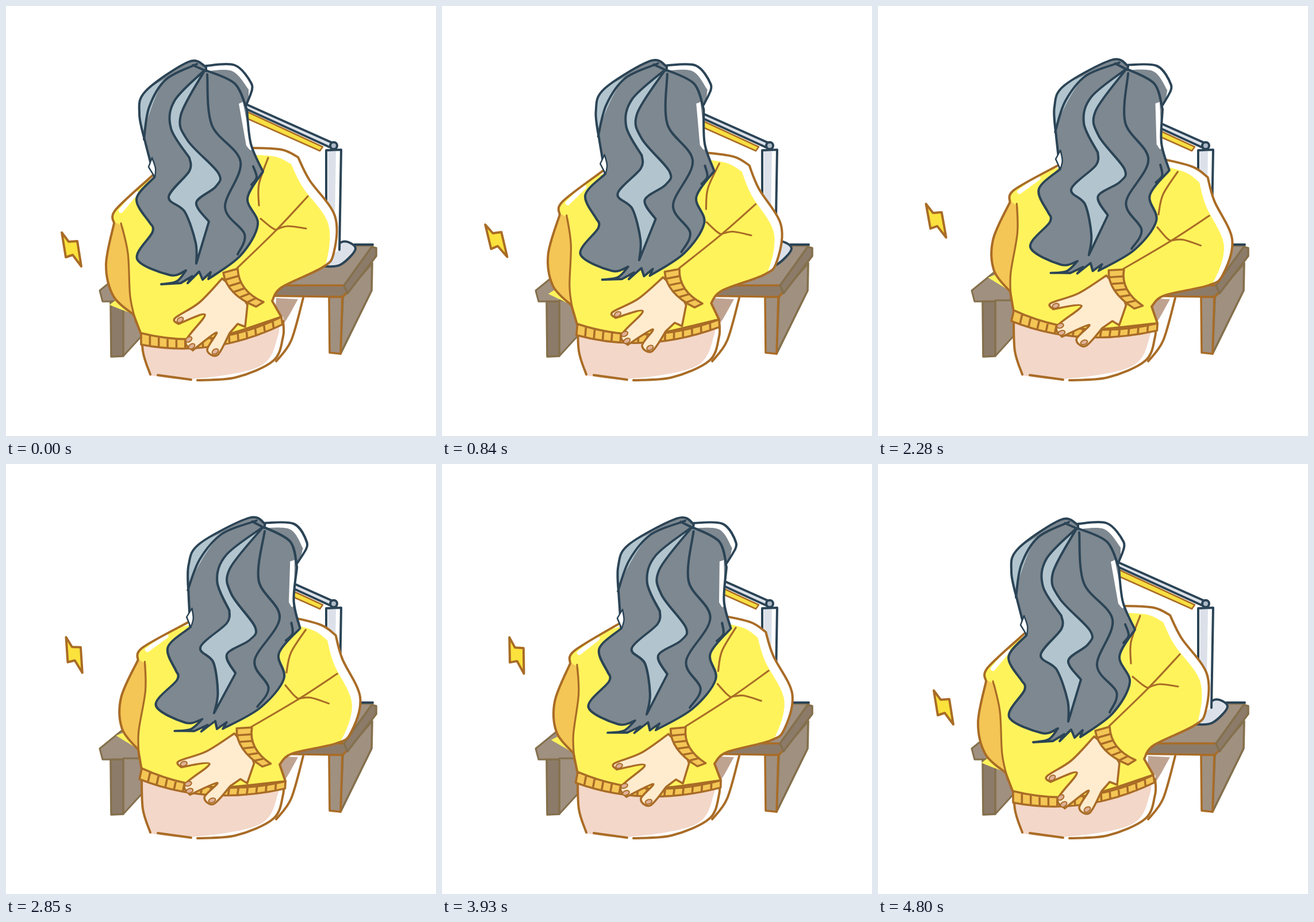
An HTML page with a canvas for the animation above (5580 ms loop, 748x748 px).

```html
<!DOCTYPE html>
<html lang="en">
<head>
<meta charset="utf-8">
<title>Stretching at the desk</title>
<style>
html, body { margin: 0; width: 100%; height: 100%; overflow: hidden; background: #fff; }
canvas { display: block; width: 748px; height: 748px; }
</style>
</head>
<body>
<canvas id="stage" width="748" height="748"></canvas>
<script>
const ctx = document.getElementById('stage').getContext('2d');
const LOOP = 5580, STEP = 30, END = 4800;
const BROWN = '#a96c26', DARK = '#2b4456', YELLOW = '#fff35c', GOLD = '#f4c655',
      HAIR = '#7e8890', SHINE = '#b2c5ce', SKIN = '#ffeccf', PINK = '#f3d7c9',
      WOOD = '#a09080', EDGE = '#8d7b69', OLIVE = '#84704c', LAMP = '#dce1e9';

// Catmull-Rom curve through "x,y" points; a leading slash marks a corner
function trace(text, bend = 1) {
  const words = text.replace(' Z', '').split(' ');
  const corner = words.map(w => w[0] === '/');
  const p = words.map(w => w.replace('/', '').split(',').map(Number));
  const last = p.length - 1, k = bend / 6;
  ctx.beginPath();
  ctx.moveTo(...p[0]);
  for (let i = 0; i < last; i++) {
    const a = p[i], b = p[i + 1];
    const before = i === 0 || corner[i] ? a : p[i - 1];
    const after = i + 1 === last || corner[i + 1] ? b : p[i + 2];
    ctx.bezierCurveTo(
      a[0] + (b[0] - before[0]) * k, a[1] + (b[1] - before[1]) * k,
      b[0] - (after[0] - a[0]) * k, b[1] - (after[1] - a[1]) * k, b[0], b[1]);
  }
  if (text.endsWith(' Z')) ctx.closePath();
}

function paint(fill, ink, width = 4) {
  if (fill) { ctx.fillStyle = fill; ctx.fill(); }
  if (ink) { ctx.strokeStyle = ink; ctx.lineWidth = width; ctx.stroke(); }
}

const shape = (text, fill, ink, width) => { trace(text); paint(fill, ink, width); };
const poly = (text, fill, ink, width) => { trace(text, 0); paint(fill, ink, width); };
const lines = (list, ink, width) => list.forEach(text => shape(text, null, ink, width));

function scoped(draw) {
  ctx.save();
  draw();
  ctx.restore();
}

// White shape whose colour is printed slightly off register
function offPrint(text, fill, dx, dy) {
  shape(text, '#fff');
  scoped(() => {
    ctx.clip();
    ctx.translate(dx, dy);
    shape(text, fill);
  });
}

// Point on a quadratic curve with control points [x, y]
const along = ([a, b, c], u) => [0, 1].map(i =>
  a[i] * (1 - u) ** 2 + 2 * b[i] * u * (1 - u) + c[i] * u * u);

// Ribbed knit band between two quadratic curves
function band(top, low, ribs) {
  const [a, b, c] = top, [d, e, f] = low;
  ctx.beginPath();
  ctx.moveTo(...a);
  ctx.quadraticCurveTo(...b, ...c);
  ctx.lineTo(...f);
  ctx.quadraticCurveTo(...e, ...d);
  ctx.closePath();
  for (let i = 1; i < ribs; i++) {
    ctx.moveTo(...along(top, i / ribs));
    ctx.lineTo(...along(low, i / ribs));
  }
  paint(GOLD, BROWN, 3.6);
}

function drawDesk() {
  poly('163,495 201,464 240,464 240,514 168,514 Z', WOOD, OLIVE, 3);
  poly('204,512 236,512 236,574 204,609 Z', WOOD, OLIVE, 3);
  poly('182,514 204,514 204,609 183,610 Z', EDGE, OLIVE, 3.5);

  poly('586,506 637,447 636,495 582,605 Z', WOOD, OLIVE, 3.6);
  poly('562,506 585,506 582,605 563,603 Z', WOOD, BROWN, 3.6);
  poly('440,487 590,487 638,417 560,417 Z', WOOD, OLIVE, 3);
  shape('440,486 /588,486 595,494 /586,506 /440,504 Z', EDGE, BROWN, 3.6);
  poly('588,486 636,419 644,421 644,435 594,500 Z', EDGE, OLIVE, 3.6);
  poly('606,415 638,415', null, DARK);
}

function drawLamp() {
  poly('400,175 551,245 546,252 400,187 Z', '#f8df42', BROWN, 2.5);
  poly('400,163 570,239 564,246 400,171 Z', LAMP, DARK);
  shape('553,452 583,411 608,422 582,450 /553,453 Z', LAMP, DARK);
  poly('557,440 557,251 583,250 580,424', '#fff', DARK);
  poly('560,253 574,253 571,430 560,438 Z', LAMP);
  ctx.beginPath();
  ctx.arc(570, 243, 6, 0, 7);
  paint('#aebac7', DARK);
}

function drawSeat() {
  shape('470,508 /517,508 496,582 /470,618 /460,570 Z', '#fff');
  shape('470,508 /508,510 480,556 /468,540 Z', '#bfa391');
  shape('517,508 496,582 470,618', null, BROWN);
  offPrint('236,530 238,600 /252,643 330,650 450,628 482,575 /482,540 Z', PINK, -9, -1);
  lines(['236,540 238,600 251,641', '264,642 322,650', '333,651 400,646 465,617 482,575 482,548'], BROWN);
}

function drawBolt([x, y, turn]) {
  scoped(() => {
    ctx.translate(x, y);
    ctx.rotate(-turn * Math.PI / 180);
    poly('-17,-30 -5,-14 10,-15 17,29 2,9 -10,13 Z', '#fbe23c', BROWN);
  });
}

function drawSweater() {
  const outline = '258,292 191,354 /188,378 174,450 187,505 /222,537 /235,571 340,582 /479,541 ' +
    '/463,513 480,489 550,455 570,430 572,365 528,303 /508,263 480,250 428,247 /350,250 Z';
  offPrint(outline, YELLOW, -12, 12);
  shape('480,541 /462,511 480,487 550,453 /520,400 /340,400 /180,520 /340,582 Z', YELLOW);
  shape('189,376 /204,383 213,430 216,505 /222,537 187,505 174,450 /189,376 Z', GOLD);
  shape('226,325 200,356', null, '#fff', 8);
  shape(outline, null, BROWN);
  lines(['200,378 212,430 216,505 226,550', '525,331 470,390 402,456', '470,389 490,383 522,387',
    '456,264 440,310 440,347', '443,370 460,384 470,390'], BROWN, 3.2);
}

function drawHand() {
  shape('376,474 336,516 294,543 /300,553 346,537 313,582 /325,599 366,568 350,598 368,607 /389,569 ' +
    '/403,553 /416,558 /420,520 /408,500 Z', SKIN, BROWN, 3.6);
  for (const [x, y] of [[303, 546], [318, 580], [323, 592], [364, 601]]) {
    ctx.beginPath();
    ctx.ellipse(x, y, 6, 4, -0.6, 0, 7);
    paint('#e0b199', BROWN, 2);
  }
}

function drawHair() {
  // far side of the fringe
  offPrint('348,104 398,103 /427,135 /427,157 /418,172 /350,125 Z', HAIR, -5, 10);
  shape('348,104 398,103 427,135 /425,155 /418,172', null, DARK);

  const mass = '348,106 318,97 243,148 232,188 /243,240 /258,298 227,336 /250,377 255,393 228,440 285,468 ' +
    '/313,460 297,479 /270,484 /304,482 /324,470 /316,482 /336,462 /342,476 /356,463 /352,475 ' +
    '408,434 438,380 420,335 /447,288 426,240 /419,180 398,135 /348,112 Z';
  shape(mass, HAIR);
  shape('405,170 /412,167 427,246 /418,243 Z', '#fff');
  shape('330,99 243,148 232,188 /238,222 273,134 /330,99 Z', SHINE);
  shape(mass, null, DARK);
  shape('345,112 293,165 287,213 /319,264 319,287 283,332 311,358 330,412 /331,448 /353,375 331,342 ' +
    '365,314 369,290 316,234 304,190 /345,113 Z', SHINE, DARK);
  shape('254,264 260,282 /259,298 /248,280 Z', '#fff', DARK, 2.5);
  lines(['332,101 278,128 249,176 240,232', '350,119 358,207 408,271 381,350 415,397 403,432',
    '430,279 436,298 427,311', '325,103 348,113'], DARK);
}

const clamp = u => Math.min(1, Math.max(0, u));

function ease(t, from, to) {
  const u = clamp((t - from) / (to - from));
  return 0.3 * u + 0.7 * u * u * (3 - 2 * u);
}

// Bolt drifts between these stops: time, then x, y, turn
const stops = [[0, 114, 424, 0], [1500, 79, 397, 7.5], [2280, 101, 374, 1], [3480, 138, 287, -12.4], [END, 114, 424, 0]];

function boltAt(t) {
  const i = Math.max(1, stops.findIndex(s => s[0] >= t));
  const [a, ...from] = stops[i - 1], [b, ...to] = stops[i];
  return from.map((v, j) => v + (to[j] - v) * (t - a) / (b - a));
}

// Affine lean about a fixed point
function leanAbout(x, y, ...matrix) {
  ctx.translate(x, y);
  ctx.transform(1, ...matrix, 0, 0);
  ctx.translate(-x, -y);
}

function render(t) {
  const lean = ease(t, 0, 1960) - ease(t, 3680, END);
  const nod = Math.sin(Math.PI * clamp((t - 1470) / 1620)) ** 2;
  const shift = 72 * lean - 8 * nod, tilt = 0.225 * lean - 0.075 * nod;

  ctx.fillStyle = '#fff';
  ctx.fillRect(0, 0, 748, 748);
  ctx.lineCap = ctx.lineJoin = 'round';
  drawDesk();
  drawLamp();
  drawSeat();
  drawBolt(boltAt(t));

  scoped(() => {
    leanAbout(435, 575, 0.2 * lean, -0.21 * lean, 1 - 0.065 * lean);
    drawSweater();
    band([[235, 569], [358, 600], [479, 541]], [[235, 589], [358, 613], [481, 554]], 16);
    drawHand();
    band([[403, 457], [405, 496], [448, 515]], [[378, 464], [384, 502], [435, 523]], 6);
  });

  scoped(() => {
    ctx.translate(shift, -4 * lean);
    leanAbout(400, 260, 0.06 * lean, -tilt, 1 - 0.035 * lean);
    drawHair();
  });
}

function tick() {
  const t = performance.now() % LOOP;
  render(Math.min(END, Math.floor(t / STEP) * STEP));
  requestAnimationFrame(tick);
}
tick();
</script>
</body>
</html>
```
